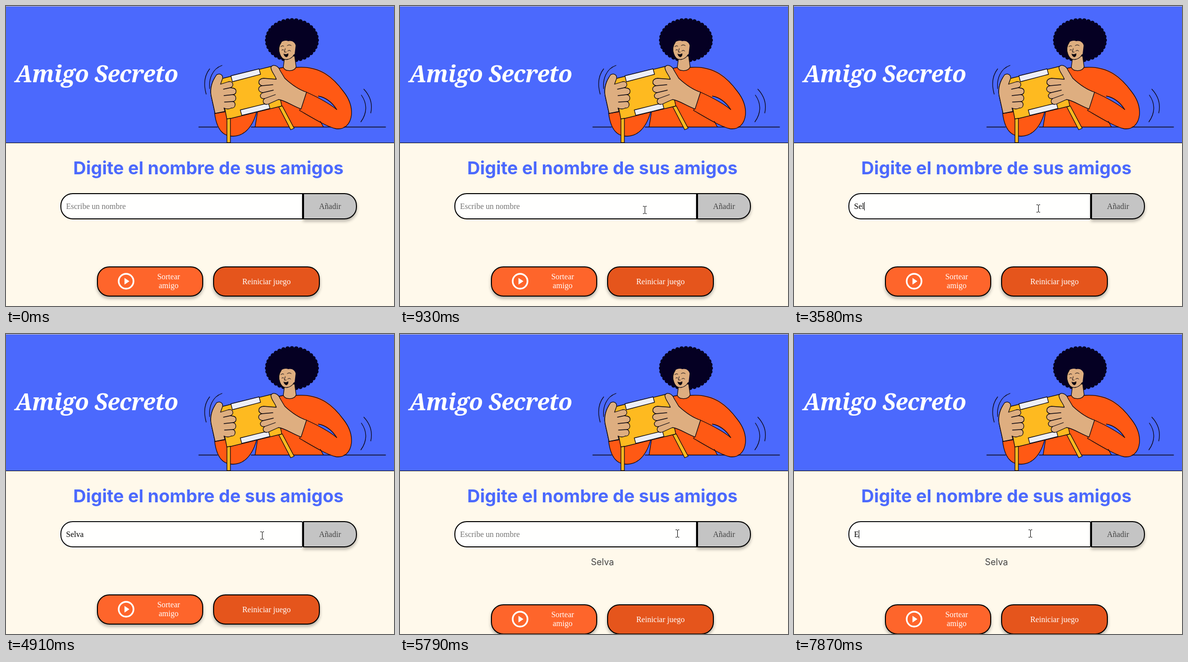
These frames come from a looping animation (785 px wide and 606 px high, 8 s). An HTML page:

```html
<!DOCTYPE html>
<html lang="es">
<head>
<meta charset="utf-8">
<title>Amigo Secreto</title>
<style>
  html, body { margin: 0; width: 100%; height: 100%; overflow: hidden; background: #fff9eb; }
  #stage { position: relative; width: 785px; height: 606px; overflow: hidden; background: #fff9eb;
    font: 16px/18px "Liberation Serif", serif; }
  #stage > *, #actions > *, #actions svg, #actions span { position: absolute; box-sizing: border-box; }
  #art { left: 0; top: 0; }
  h2 { left: 0; top: 305px; width: 819px; margin: 0; text-align: center; color: #4b69fd;
    font: 700 36px/44px Inter, sans-serif; }
  #field { left: 110px; top: 378px; width: 491px; height: 53px; padding-left: 9.5px; background: #fffffe;
    border: 2px solid #000; border-radius: 25px 0 0 25px; line-height: 49px; white-space: pre; }
  #field.focus { border-color: #101010; border-radius: 25px 3px 3px 25px; box-shadow: 0 0 0 1px #fff; }
  #hint { color: #757575; }
  #hint, #typed { position: absolute; left: 9.5px; top: 0; }
  #caret { display: inline-block; width: 1px; height: 17px; margin-right: -1px; vertical-align: -3px; background: #000; }
  .button { border: 2px solid #000; border-radius: 25px; text-align: center;
    box-shadow: 0 4px 6px rgba(0, 0, 0, .3); }
  #add { left: 601px; top: 378px; width: 109px; height: 53px; border-radius: 0 25px 25px 0;
    line-height: 49px; color: #444; }
  #friend { left: 0; top: 449px; width: 819px; text-align: center; color: #444; font: 18px/24px Inter, sans-serif; }
  #actions { left: 0; top: 526px; width: 785px; height: 61px; color: #fff; }
  #draw { left: 184px; width: 215px; height: 61px; background: #fe652b; }
  #draw svg { left: 37px; top: 8px; }
  #draw span { left: 103px; top: 10px; width: 80px; }
  #reset { left: 419px; width: 216px; height: 61px; line-height: 57px; }
  #pointer { left: 0; top: 0; overflow: visible; }
</style>
</head>
<body>
<div id="stage">
  <svg id="art" width="785" height="278" fill="none" stroke="#0c0710" stroke-width="1.3" stroke-linejoin="round" stroke-linecap="round">
    <g stroke="none">
      <rect width="785" height="277" fill="#4b69fd"/>
      <rect width="785" height="1" fill="#cfc8c0"/>
      <rect y="276" width="785" height="1" fill="#000"/>
      <text x="18.5" y="154" fill="#fff" font-family="'Noto Serif', serif" font-size="46.5" font-weight="700" font-style="italic" letter-spacing="-.7">Amigo Secreto</text>
    </g>
    <path d="M412 127C401 141 400 160 405 178M437 120C417 127 410 148 412 167M724 168C738 183 742 198 738 216M719 180C731 197 731 216 718 234"/>

    <g fill="#ff5914">
      <path d="M422 216C425 241 433 258 450 262C479 268 501 246 509 205L440 202Z"/>
      <path d="M504 244L511 200L541 128L562 124H587C635 119 661 142 683 173L660 235L636 232L642 244Z" stroke="none"/>
      <path d="M683 173C694 187 700 203 699 219C697 240 684 250 668 248C651 245 620 226 594 211L608 174Z" stroke="none"/>
    </g>
    <path d="M632 182C648 185 660 195 669 209C657 200 645 193 632 186Z" fill="#4b69fd" stroke="none"/>
    <path d="M504 244L511 200M541 128L562 124M636 233L642 244M632 182C648 185 660 195 669 209"/>
    <path d="M587 124C637 120 664 147 683 173C694 187 700 203 699 219C697 240 684 250 668 248C651 245 620 226 594 211L608 174C630 184 653 196 669 209"/>
    <path d="M390 244.5H428M496 244.5H657M684 244.5H768"/>

    <g id="hair" fill="#050023" stroke="none"><ellipse cx="578.5" cy="69" rx="51" ry="41"/></g>
    <path d="M564 101L561 124C565 133 583 133 587 123L584 101Z" fill="#deae80"/>
    <path d="M557 73C552 80 551 89 554 97C557 106 563 109 569 108C577 107 581 102 584 97L586 80C585 72 576 69 571 71C567 69 561 70 557 73Z" fill="#deae80" stroke="none"/>
    <path d="M557 73C552 80 551 89 554 97C557 106 563 109 569 108C576 107 580 103 583 98"/>
    <path d="M556 82Q559 79 562 81M569 80Q573 77 577 80M558 89Q560 87 562 89M570 91Q573 88 576 91M565 86L563 93L567 93" stroke-width="1"/>
    <path d="M562 97Q567 99 571 96Q571 103 567 103Q563 102 562 97Z" fill="#0c0710" stroke-width=".6"/>

    <path d="M423 217L415 181C412 164 418 149 427 139L440 150L447 213Z" fill="#deae80"/>
    <g fill="#feba20">
      <path d="M431 148L541 121L558 202L447 229Z"/>
      <path d="M447 228L454 227V276H447Z"/>
      <path d="M552 204L559 202L583 247L576 250Z"/>
    </g>
    <g fill="#eeeff7">
      <path d="M455 141L512 127L515 138L458 153Z"/>
      <path d="M474 210L531 196L534 207L477 221Z"/>
    </g>
    <g fill="#deae80">
      <path d="M423 217L415 181C412 163 419 149 426 139C432 135 440 139 438 147L434 158L450 153C460 151 462 162 454 165L460 166C468 168 467 178 459 179C467 180 467 192 459 193C466 194 465 207 456 206C449 210 443 207 441 206L443 213Z"/>
      <path d="M454 165L440 168M459 179L441 181M459 193L442 194"/>
      <path d="M608 174C592 169 578 159 564 146L555 131C550 119 539 117 536 124C536 132 544 139 547 148L521 146C510 147 508 158 518 161C507 163 510 175 520 175C511 179 514 188 523 187C517 193 522 201 531 198L551 189C564 190 580 202 597 208Z"/>
      <path d="M518 161L540 159M520 175L541 170M523 187L545 179"/>
    </g>
  </svg>

  <h2>Digite el nombre de sus amigos</h2>
  <div id="field"><span id="hint">Escribe un nombre</span><span id="typed"><span id="text"></span><i id="caret"></i></span></div>
  <div id="add" class="button">Añadir</div>
  <div id="friend">Selva</div>
  <div id="actions">
    <div id="draw" class="button">
      <svg width="40" height="40" viewBox="0 0 24 24" fill="#fff"><circle cx="12" cy="12" r="9" fill="none" stroke="#fff" stroke-width="2"/><path d="M10 8L16 12L10 16Z"/></svg>
      <span>Sortear<br>amigo</span>
    </div>
    <div id="reset" class="button">Reiniciar juego</div>
  </div>

  <svg id="pointer" width="1" height="1" fill="#fff" stroke="#000" stroke-linejoin="round">
    <path id="arrow" d="M.5 .5V16.5L4.2 13L6.7 18.7L9 17.7L6.6 12.1H11.7Z"/>
    <path id="beam" fill="none" d="M-3.5 -7.5H-1L.5 -6.5L2 -7.5H4M.5 -6.5V6.5M-3.5 7.5H-1L.5 6.5L2 7.5H4"/>
    <path id="hand" d="M-2 1C-2 -1 2 -1 2 1V8C3 6 5.5 7 5.5 9C7 7.5 8.5 8.5 8.5 10C10 9 11 10 11 12V17C11 19 9 20 9 23H-1C-1 20 -6 16 -6.5 13.5C-6.5 11 -4 11 -2 14Z"/>
  </svg>
</div>

<script>
const LOOP = 8000;
const $ = id => document.getElementById(id);

for (let i = 0; i < 36; i++) {
  const a = i / 36 * 2 * Math.PI;
  const bump = document.createElementNS('http://www.w3.org/2000/svg', 'circle');
  bump.setAttribute('cx', 578.5 + 50 * Math.cos(a));
  bump.setAttribute('cy', 69 + 40 * Math.sin(a));
  bump.setAttribute('r', 4.6);
  $('hair').append(bump);
}

// Every row starts with the time in ms from which it holds.
const pointer = [
  [0, 'none', 0, 0],
  [450, 'arrow', 652, 560], [520, 'arrow', 614, 538], [580, 'arrow', 581, 520], [650, 'arrow', 545, 499],
  [720, 'arrow', 522, 470], [790, 'arrow', 507, 443], [860, 'beam', 499, 420], [930, 'beam', 495, 412],
  [1070, 'beam', 494, 409],
  [4910, 'beam', 518, 407], [4980, 'beam', 580, 403], [5050, 'hand', 632, 400], [5120, 'hand', 649, 399],
  [5200, 'hand', 654, 399],
  [5720, 'hand', 625, 400], [5790, 'beam', 561, 403], [5860, 'beam', 512, 403], [5930, 'beam', 484, 403],
  [6000, 'beam', 478, 403]
];
const text = [[0, ''], [2730, 'S'], [3180, 'Se'], [3580, 'Sel'], [3980, 'Selv'], [4110, 'Selva'], [5650, ''], [7870, 'E']];
const focus = [[0, false], [1200, true], [5520, false], [6330, true]];
const caret = [[0, true], [1730, false], [2330, true], [4640, false], [5140, true], [6860, false], [7400, true]];
const addColor = [[0, '#c4c4c4'], [5050, '#b5b5b5'], [5120, '#a8a8a8'], [5200, '#a1a1a1'], [5720, '#b4b4b4'], [5790, '#c4c4c4']];
const resetColor = [[0, '#e5551c'], [450, '#dd501b'], [520, '#d44b19'], [650, '#dc501b'], [720, '#e5551c']];
const listed = [[0, false], [5650, true]];

const at = (rows, t) => rows.findLast(row => row[0] <= t).slice(1);
const show = (id, on) => $(id).style.visibility = on ? 'visible' : 'hidden';
const start = performance.now();

function render() {
  const t = (performance.now() - start) % LOOP;
  const [shape, x, y] = at(pointer, t);
  const [value] = at(text, t), [focused] = at(focus, t), [added] = at(listed, t);

  for (const id of ['arrow', 'beam', 'hand']) show(id, id === shape);
  $('pointer').style.transform = `translate(${x}px, ${y}px)`;
  $('text').textContent = value;
  show('hint', !value);
  $('field').className = focused ? 'focus' : '';
  show('caret', focused && at(caret, t)[0]);
  $('add').style.background = at(addColor, t)[0];
  $('reset').style.background = at(resetColor, t)[0];
  show('friend', added);
  $('actions').style.transform = `translateY(${added ? 20 : 0}px)`;
  requestAnimationFrame(render);
}
render();
</script>
</body>
</html>
```
